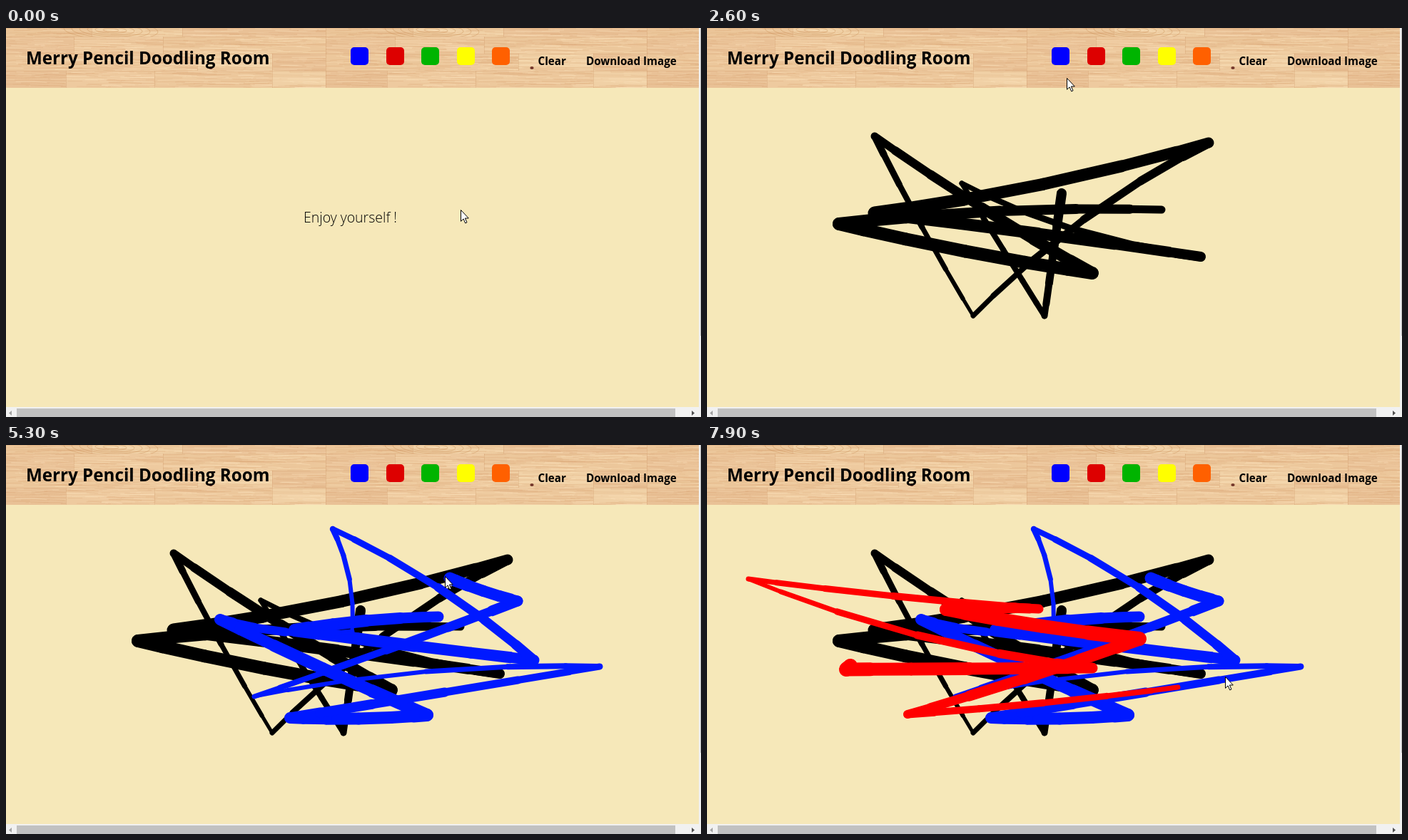
Animation, 974 px wide and 546 px high, one loop 8 s. Source, as an HTML page with a canvas:

```html
<!DOCTYPE html>
<html lang="en">
<head>
<meta charset="utf-8">
<title>Drawing page</title>
<style>
  html, body { margin: 0; width: 100%; height: 100%; overflow: hidden; background: #f6e8b9; }
  canvas, svg { position: absolute; left: 0; top: 0; }
  text { font-family: "Open Sans", "Noto Sans", sans-serif; font-weight: 700; }
  #hint { font-weight: 300; }
</style>
</head>
<body>
<canvas id="board" width="974" height="546"></canvas>
<canvas id="wood" width="971" height="84"></canvas>
<svg width="974" height="546" viewBox="0 0 974 546">
  <text x="28" y="51" font-size="24.2">Merry Pencil Doodling Room</text>
  <g id="swatches"></g>
  <text x="745.5" y="52" font-size="15.2">Clear</text>
  <text x="813" y="52" font-size="15.2">Download Image</text>
  <text id="hint" x="417" y="273" font-size="19.5">Enjoy yourself !</text>
  <g shape-rendering="crispEdges">
    <path fill="#f1f1f1" d="M971 0h3v546h-3zM0 532h974v14H0z"/>
    <path fill="#c1c1c1" d="M973 0h1v432h-1zM15 534h923v12H15z"/>
  </g>
  <path fill="#a3a3a3" d="M8 537v7l-4-3.5z"/>
  <path fill="#505050" d="M961 537v7l4-3.5z"/>
  <path id="cursor" fill="#fff" stroke="#000" d="M.5.5v15.8l3.6-3.4 2.6 6 2.3-1-2.6-5.9h4.9z"/>
</svg>
<script>
const LOOP = 8000, STEP = 100, SAMPLES = 6;
const $ = id => document.getElementById(id);
const mix = (a, b, k) => a + (b - a) * k;

// The hand slows down towards each corner.
const ease = k => k - Math.sin(2 * Math.PI * k) / (4 * Math.PI);

// Corners are [x, y, pen width, bow of the leg that arrives there]; each leg takes the same time.
const strokes = [
  { color: '#000', start: 192, leg: 222, corners: [
    [637, 255, 10, 0], [185, 275, 18, 8], [540, 344, 18, 4], [235, 152, 11, -5],
    [373, 404, 5, 3], [703, 161, 14, -17], [235, 260, 19, -9], [692, 321, 14, -2],
    [357, 218, 7, -16], [473, 404, 8, 0], [497, 232, 14, 0]] },
  { color: '#0019ff', start: 3330, leg: 177.5, corners: [
    [606, 241, 14, 0], [405, 260, 18, 4], [740, 302, 15, 1], [458, 118, 8, 12],
    [485, 262, 5, -10], [300, 245, 15, -9], [590, 379, 18, 2], [398, 383, 16, -3],
    [832, 311, 9, 0], [348, 353, 5, 14], [717, 219, 15, 2], [622, 187, 17, -2]] },
  { color: '#f00', start: 6770, leg: 138, corners: [
    [201, 310, 20, 0], [195, 315, 20, 0], [540, 313, 15, 0], [58, 188, 6, -17],
    [465, 230, 12, 3], [335, 231, 18, 2], [606, 272, 20, 3], [281, 378, 12, -3],
    [660, 340, 7, 3]] }
];

// A point on the curved leg from a to b, with the pen width there.
function along([ax, ay, aw], [bx, by, bw, bow], k) {
  const s = ease(k), dx = bx - ax, dy = by - ay;
  const off = 4 * s * (1 - s) * bow / Math.hypot(dx, dy);
  return { x: ax + dx * s - dy * off, y: ay + dy * s + dx * off, w: mix(aw, bw, k) };
}

for (const s of strokes) {
  s.points = [];
  for (let i = 0; i <= (s.corners.length - 1) * SAMPLES; i++) {
    const n = Math.max(1, Math.ceil(i / SAMPLES)), k = i / SAMPLES - n + 1;
    s.points.push({ t: s.start + i / SAMPLES * s.leg, ...along(s.corners[n - 1], s.corners[n], k) });
  }
}

// The pointer follows the strokes and visits the swatches between them.
const visits = [
  [0, 637, 255], [2600, 504, 70], [2800, 495, 42], [2900, 495, 42],
  [5300, 615, 184], [5800, 546, 42], [6100, 546, 42],
  [6300, 440, 150], [6500, 212, 302], [7900, 726, 325]
].map(([t, x, y]) => ({ t, x, y }));
const track = visits.concat(...strokes.map(s => s.points)).sort((a, b) => a.t - b.t);

function pointerAt(t) {
  const i = track.findIndex(p => p.t > t);
  if (i < 0) return track[track.length - 1];
  const a = track[i - 1], b = track[i], k = (t - a.t) / (b.t - a.t);
  return { x: mix(a.x, b.x, k), y: mix(a.y, b.y, k) };
}

const pen = $('board').getContext('2d');
pen.lineCap = 'round';

function draw(t) {
  pen.clearRect(0, 0, 974, 546);
  for (const { color, points } of strokes) {
    pen.strokeStyle = color;
    for (let i = 1; i < points.length && points[i].t <= t; i++) {
      const a = points[i - 1], b = points[i];
      pen.lineWidth = Math.round(b.w);
      pen.beginPath();
      pen.moveTo(a.x, a.y);
      pen.lineTo(b.x, b.y);
      pen.stroke();
    }
  }
  const { x, y } = pointerAt(t);
  $('cursor').setAttribute('transform', `translate(${Math.round(x)} ${Math.round(y)})`);
  $('hint').style.display = t < strokes[0].start ? '' : 'none';
}

// Planks with seeded grain on one tile, repeated across the header.
function paintWood() {
  const W = 450, tile = document.createElement('canvas');
  tile.width = W;
  tile.height = 84;
  const g = tile.getContext('2d');
  let seed = 17;
  const rnd = () => (seed = seed * 16807 % 2147483647) / 2147483647;
  const tones = ['#ecc79b', '#f0d0a5', '#e9c196', '#eeca9f'];
  const joints = [[122, 249], [97, 222], [270, 375], [86, 210, 375]];

  function plank(x, y, w, h, tone) {
    g.save();
    g.beginPath();
    g.rect(x, y, w, h);
    g.clip();
    g.fillStyle = tone;
    g.fillRect(x, y, w, h);
    for (let n = 0; n < w * h / 60; n++) {
      const gx = x - 20 + rnd() * w, gy = y + rnd() * h, len = 20 + rnd() * 70;
      g.strokeStyle = rnd() < 0.55 ? 'rgba(208,150,100,.2)' : 'rgba(255,232,194,.3)';
      g.lineWidth = 0.5 + rnd();
      g.beginPath();
      g.moveTo(gx, gy);
      g.quadraticCurveTo(gx + len / 2, gy + rnd() * 4 - 2, gx + len, gy + rnd() * 3 - 1);
      g.stroke();
    }
    g.fillStyle = 'rgba(190,126,78,.2)';
    g.fillRect(x, y, w, 1);
    g.fillRect(x, y, 1, h);
    g.restore();
  }

  joints.forEach((row, r) => {
    const top = r ? r * 24 - 12 : 0, h = r ? 24 : 12;
    [0, ...row].forEach((x, i) => plank(x, top, (row[i] || W) - x, h, tones[(r * 2 + i) % 4]));
  });

  g.strokeStyle = 'rgba(197,139,82,.4)';
  g.save();
  g.beginPath();
  g.rect(70, 0, 155, 12);
  g.clip();
  for (let i = 1; i < 7; i++) {
    g.beginPath();
    g.ellipse(149, 3, i * 11, i * 2.2, 0.04, 0, 7);
    g.stroke();
  }
  g.restore();
  g.fillStyle = '#74372b';
  g.beginPath();
  g.ellipse(289, 56, 2.6, 2, 0, 0, 7);
  g.fill();

  const out = $('wood').getContext('2d');
  for (let x = -2; x < 971; x += W) out.drawImage(tile, x, 0);
}

paintWood();
$('swatches').innerHTML = ['#00f', '#d00', '#00b400', '#ff0', '#ff6000'].map((c, i) =>
  `<rect x="${Math.round(483 + i * 49.6)}" y="27" width="25" height="25" rx="5" fill="${c}"/>`).join('');

let shown = -1;
function tick(now) {
  const t = Math.floor(now % LOOP / STEP) * STEP;
  if (t !== shown) draw(shown = t);
  requestAnimationFrame(tick);
}
draw(0);
requestAnimationFrame(tick);
</script>
</body>
</html>
```
